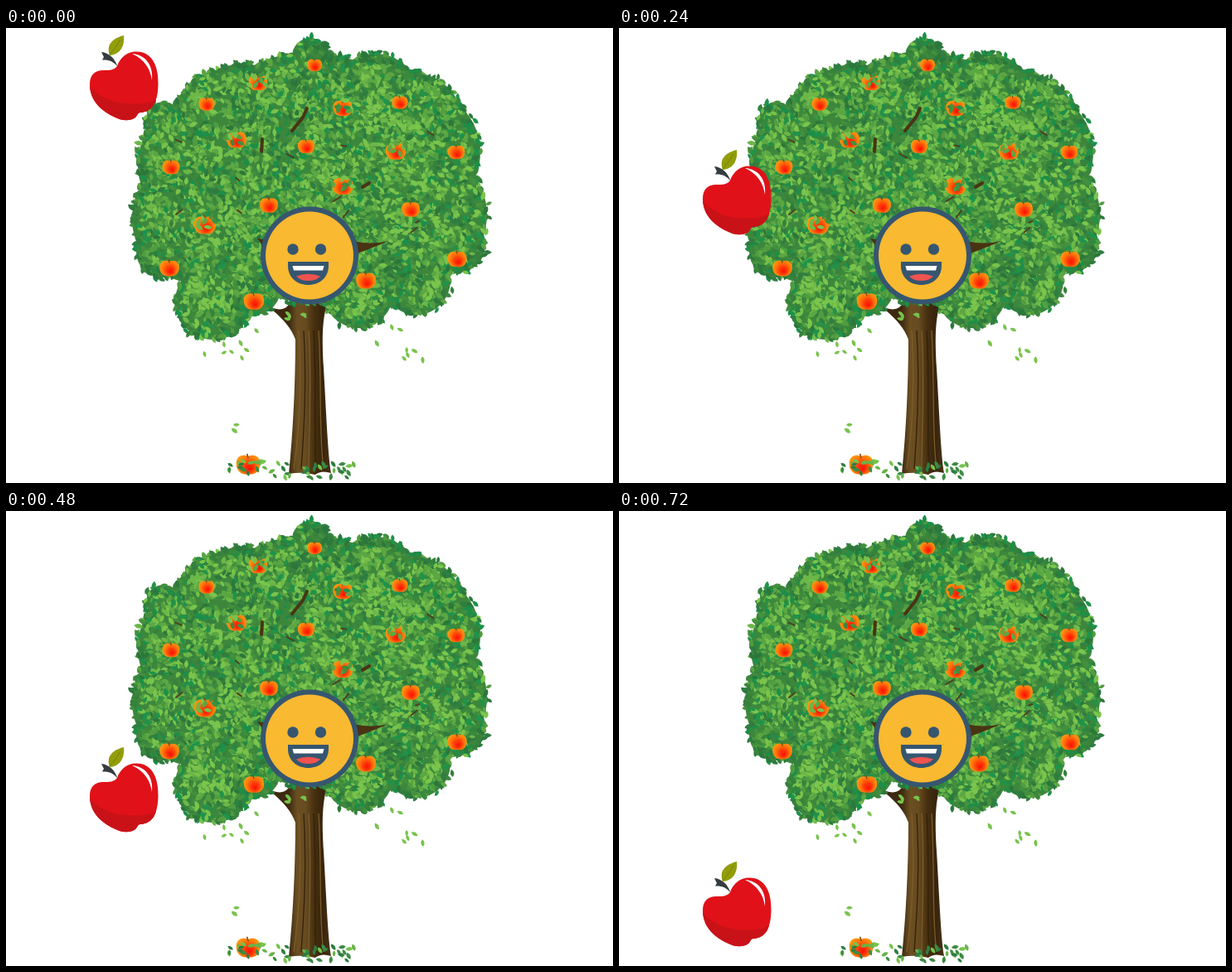
Recreate the animation shown at these times as an HTML page with a canvas. Size 732 px wide and 549 px high, loop 840 ms.

```html
<!DOCTYPE html>
<html lang="en">
<head>
<meta charset="utf-8">
<title>Falling apple</title>
<style>
  html, body { margin: 0; width: 100%; height: 100%; overflow: hidden; background: #fff; }
  canvas { display: block; }
</style>
</head>
<body>
<canvas id="stage" width="732" height="549"></canvas>
<script>
const W = 732, H = 549, STEP_MS = 120, STEPS = 7, DROP = 69;
const DARK = ['#2c773b', '#36813c', '#2f7d41', '#1b8f49'];
const MID = ['#43903e', '#509c40', '#5ca643', '#1f934a', '#3b873d'];
const LIGHT = ['#7ac54c', '#6cb748', '#79c24b', '#5ba744'];

const stage = document.getElementById('stage').getContext('2d');
const backdrop = document.createElement('canvas');
backdrop.width = W;
backdrop.height = H;
const g = backdrop.getContext('2d');

let seed = 11;
const rand = (a = 0, b = 1) => {
  seed = (seed * 16807) % 2147483647;
  return a + (b - a) * seed / 2147483647;
};
const pick = list => list[Math.floor(rand() * list.length)];

function fill(ctx, color, d) {
  ctx.fillStyle = color;
  ctx.fill(new Path2D(d));
}

function line(ctx, color, width, d) {
  ctx.strokeStyle = color;
  ctx.lineWidth = width;
  ctx.stroke(new Path2D(d));
}

function disc(x, y, r, color) {
  g.beginPath();
  g.arc(x, y, r, 0, 2 * Math.PI);
  g.fillStyle = color;
  g.fill();
}

function blend(gradient, ...colors) {
  colors.forEach((color, i) => gradient.addColorStop(i / (colors.length - 1), color));
  return gradient;
}

function leaf(x, y, size, angle, color) {
  const dx = Math.cos(angle) * size / 2, dy = Math.sin(angle) * size / 2;
  g.beginPath();
  g.moveTo(x - dx, y - dy);
  g.quadraticCurveTo(x - dy, y + dx, x + dx, y + dy);
  g.quadraticCurveTo(x + dy, y - dx, x - dx, y - dy);
  g.fillStyle = color;
  g.fill();
}

function drawTrunk() {
  const bark = blend(g.createLinearGradient(341, 0, 392, 0),
    '#3d2910', '#6b4f22', '#674b21', '#47300f', '#38240d', '#4a3215');
  fill(g, bark, 'M322 338Q338 343 343 330H388C381 352 381 375 383 410C386 460 388 515 392 537' +
    'Q380 533 373 539Q357 535 341 538C346 490 349 430 349 376C344 362 335 352 322 341Z');
  for (let i = 0; i < 5; i++) {
    const x = 353 + i * 6, foot = 347 + i * 9;
    line(g, i % 2 ? '#342109' : '#7b5d2a', 1.3, `M${x} 365C${x + 4} 430 ${x} 490 ${foot} 532`);
  }
}

// The crown is a union of round clumps: x, y, radius.
const clumps = [
  [366, 180, 152], [367, 34, 23], [285, 100, 58], [268, 118, 70], [190, 110, 22], [240, 165, 82],
  [230, 230, 79], [188, 270, 32], [250, 330, 47], [300, 315, 32], [445, 85, 55], [490, 115, 62],
  [495, 150, 78], [500, 225, 81], [545, 262, 34], [495, 305, 42], [425, 320, 43]
];
const depth = (x, y) => Math.max(...clumps.map(([cx, cy, r]) => r - Math.hypot(x - cx, y - cy)));

function drawCrown() {
  clumps.forEach(([x, y, r]) => disc(x, y, r - 1, '#3d873d'));
  for (let i = 0; i < 8600; i++) {
    const x = rand(145, 587), y = rand(8, 382), d = depth(x, y);
    if (d < rand(-3, 2)) continue;
    const shade = Math.sin(x * .065 + 2 * Math.sin(y * .045)) * Math.cos(y * .07 + Math.sin(x * .04));
    const tone = rand() + shade * .25 - (d < 11 ? .38 : 0);
    leaf(x, y, rand(8, 11.5), rand(-.5, 2.2), pick(tone < .18 ? DARK : tone < .55 ? MID : LIGHT));
  }
}

function drawBranches() {
  g.lineCap = 'round';
  fill(g, '#493313', 'M420 257Q439 262 461 257Q443 265 421 273ZM303 254L318 256L313 268Z');
  line(g, '#4a3413', 4, 'M345 124L358 108L363 97M309 134L308 149M430 192L438 187');
  for (let i = 0; i < 12; i++) {
    const x = rand(190, 540), y = rand(75, 265);
    line(g, '#52401d', 2, `M${x} ${y}l${rand(4, 9)} ${rand(-8, 8)}`);
  }
}

function fruit(x, y, r) {
  g.save();
  g.translate(x, y);
  g.scale(r, r);
  const skin = blend(g.createRadialGradient(.15, .35, 0, 0, 0, 1.1), '#ff0d05', '#ff3808', '#ff780c', '#ffa412');
  fill(g, skin, 'M0-.7C.5-.95 1-.7 1-.1C1 .55 .6 .9 0 .78C-.6 .9-1 .5-1-.1C-1-.7-.5-.95 0-.7Z');
  line(g, '#8a4a10', .12, 'M0-.6L-.08-.88');
  g.restore();
}

function drawFruits() {
  const size = y => 8.5 + y / 90;
  const open = [[372, 45], [242, 92], [475, 90], [362, 143], [199, 168], [543, 150], [317, 214],
    [488, 219], [197, 290], [544, 279], [434, 305], [299, 330], [292, 527]];
  const hidden = [[304, 66], [278, 135], [406, 97], [470, 149], [406, 191], [240, 238]];
  open.forEach(([x, y]) => fruit(x, y, size(y)));
  hidden.forEach(([x, y]) => {
    const r = size(y) + 2;
    fruit(x, y, r);
    for (let i = 0; i < 9; i++) {
      leaf(x + rand(-r, r), y + rand(-r, r * .35), 10, rand(-.5, 2.2), pick(MID.concat(LIGHT)));
    }
  });
}

// Scatters leaves over a box around a centre.
function scatter(count, cx, cy, dx, dy, colors) {
  for (let i = 0; i < count; i++) {
    leaf(cx + rand(-dx, dx), cy + rand(-dy, dy), rand(7, 9.5), rand(-.6, 1.8), pick(colors));
  }
}

function drawLooseLeaves() {
  const fresh = ['#78c34c'];
  scatter(9, 268, 383, 42, 24, fresh);
  scatter(8, 480, 382, 36, 32, fresh);
  scatter(5, 352, 347, 16, 6, fresh);
  scatter(2, 276, 480, 5, 6, fresh);
  const ground = ['#78c34c', '#69b348', '#2f7d41', '#3d8b44'];
  scatter(24, 306, 533, 38, 11, ground);
  scatter(26, 390, 535, 32, 9, ground);
}

function drawFace() {
  const navy = '#36566f';
  disc(366, 274.5, 59, navy);
  disc(366, 274.5, 53, '#f9b931');
  disc(346, 267, 6.7, navy);
  disc(379.5, 267, 6.7, navy);
  fill(g, navy, 'M340 282H389V287C389 301 378 310 364.5 310S340 301 340 287Z');
  fill(g, '#fff', 'M345.5 287H383.5L382 292.5H347Z');
  fill(g, '#ef5350', 'M350 299.5Q364.5 294 379 299.5Q374 305 364.5 305T350 299.5Z');
}

function drawApple(y) {
  stage.save();
  stage.translate(0, y);
  const body = new Path2D('M134 46C138 35 146 28.5 157 28.5C177 28.5 184 47 183.5 68C183 88 178 101 162 102' +
    'C159 102 159 105 156 108C149 113 139 112 130 107C113 99 101 86 101 68C101 56 108 51 117 51' +
    'C125 51 130 51 134 46Z');
  stage.fillStyle = '#e01119';
  stage.fill(body);
  stage.save();
  stage.clip(body);
  fill(stage, '#c81218', 'M99 68C111 84 130 91 150 91.5C165 92 177 90 186 83V115H99Z');
  stage.restore();
  fill(stage, '#fff', 'M152 31C168 32 178 45 176 63C174 49 167 38 152 31Z');
  fill(stage, '#353c40', 'M115 29C124 30 131 36 134.5 46.5C129 40 124 38 116 38.5L118 35Z');
  fill(stage, '#929d09', 'M125 33C120 19 130 12 142 9C143.5 21 138 32 125 33Z');
  line(stage, '#76820a', 1, 'M125 32Q132 25 138 14');
  stage.restore();
}

g.fillStyle = '#fff';
g.fillRect(0, 0, W, H);
drawTrunk();
drawCrown();
drawBranches();
drawFruits();
drawLooseLeaves();
drawFace();

const start = performance.now();
function render() {
  const step = Math.floor((performance.now() - start) / STEP_MS) % STEPS;
  stage.drawImage(backdrop, 0, 0);
  drawApple(step * DROP);
  requestAnimationFrame(render);
}
render();
</script>
</body>
</html>
```
